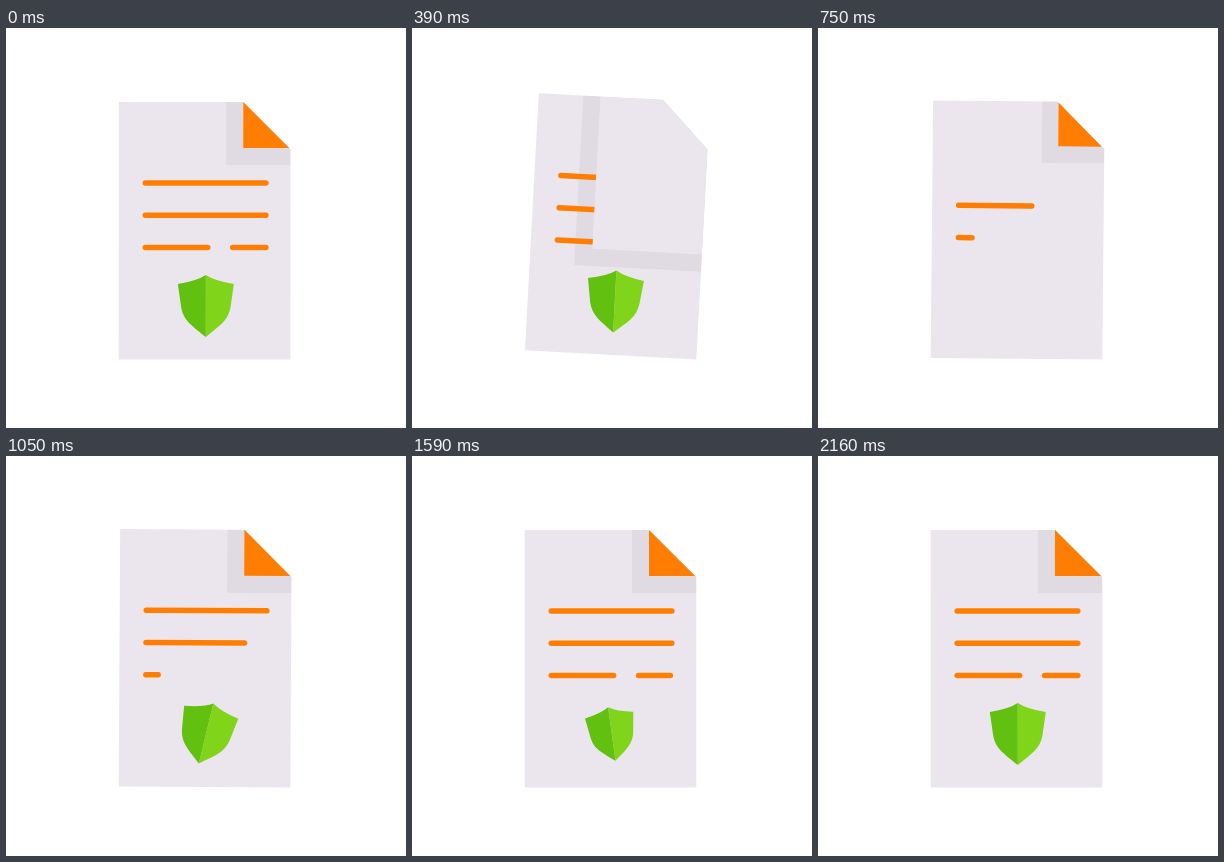
An HTML page with a canvas for the animation above (2800 ms loop, 400x400 px).

```html
<!DOCTYPE html>
<html>
<head>
<meta charset="utf-8">
<style>
html, body { margin: 0; height: 100%; overflow: hidden; background: #fff; }
canvas { display: block; }
</style>
</head>
<body>
<canvas id="stage" width="400" height="400"></canvas>
<script>
const ctx = document.getElementById('stage').getContext('2d');
const LOOP = 2800;
const PAPER = '#ebe6ed', SHADE = '#e0dbe3', ORANGE = '#ff7d00';
const GREEN_DARK = '#61c010', GREEN_LIGHT = '#80d41a';
const LEFT = 112.7, TOP = 74, RIGHT = 284.3, BOTTOM = 331.5;
const FOLD_W = 47.3, FOLD_H = 46, SHADOW = 17;

// x1, x2, y, start of drawing
const LINES = [
  [139.2, 259.8, 155, 410],
  [139.2, 259.8, 187.3, 620],
  [139.2, 201.6, 219.5, 875],
  [226.6, 259.8, 219.5, 1071]
];
const DRAW_TIME = 600;

const SWING = [[265, 6.9], [560, -3], [860, 2], [1120, 0]];
const SHIELD_SIZE = [[780, 0], [1130, 1.13], [1570, 0.87], [1920, 1]];
const SHIELD_TILT = [[780, 0], [1130, 15], [1570, -8], [1950, 0]];

const rad = deg => deg * Math.PI / 180;
const mix = (a, b, p) => a + (b - a) * p;
const ramp = (t, a, b) => Math.min(1, Math.max(0, (t - a) / (b - a)));
const ease = (t, a, b) => 0.5 - 0.5 * Math.cos(Math.PI * ramp(t, a, b));

function track(keys, t) {
  let value = keys[0][1];
  for (let i = 1; i < keys.length; i++) {
    if (t >= keys[i - 1][0]) value = mix(keys[i - 1][1], keys[i][1], ease(t, keys[i - 1][0], keys[i][0]));
  }
  return value;
}

function pageAngle(t) {
  const [peak, angle] = SWING[0];
  return t < peak ? angle * Math.sin(t / peak * Math.PI / 2) : track(SWING, t);
}

function pagePath() {
  ctx.beginPath();
  ctx.moveTo(LEFT, TOP);
  ctx.lineTo(RIGHT - FOLD_W, TOP);
  ctx.lineTo(RIGHT, TOP + FOLD_W);
  ctx.lineTo(RIGHT, BOTTOM);
  ctx.lineTo(LEFT, BOTTOM);
  ctx.closePath();
}

function cornerRect(w, h, color) {
  ctx.fillStyle = color;
  ctx.fillRect(RIGHT - w, TOP, w, h);
}

function drawLines(t, shift) {
  ctx.strokeStyle = ORANGE;
  ctx.lineWidth = 5.5;
  ctx.lineCap = 'round';
  for (const [x1, x2, y, start] of LINES) {
    const p = ease(t, start, start + DRAW_TIME);
    if (!p) continue;
    ctx.beginPath();
    ctx.moveTo(x1, y + shift);
    ctx.lineTo(mix(x1, x2, p), y + shift);
    ctx.stroke();
  }
}

function shieldHalf(side, color) {
  ctx.beginPath();
  ctx.moveTo(0, -31);
  ctx.quadraticCurveTo(9 * side, -25, 28 * side, -22);
  ctx.lineTo(25 * side, -1);
  ctx.bezierCurveTo(23 * side, 14, 16 * side, 18, 0, 31);
  ctx.closePath();
  ctx.fillStyle = color;
  ctx.fill();
}

function drawShield(size, tilt) {
  if (size <= 0) return;
  ctx.save();
  ctx.translate(199.8, 278);
  ctx.rotate(rad(tilt));
  ctx.scale(size, size);
  shieldHalf(1, GREEN_LIGHT);
  shieldHalf(-1, GREEN_DARK);
  ctx.restore();
}

function drawContent(t) {
  drawLines(t, 60 * (1 - ease(t, 410, 1010)));
  drawShield(track(SHIELD_SIZE, t), track(SHIELD_TILT, t));
}

function drawNewSheet(t) {
  const p = ease(t, 500, 780);
  const w = FOLD_W * p, h = FOLD_H * p;
  cornerRect(w + SHADOW * p, h + SHADOW * p, SHADE);
  drawContent(t);
  cornerRect(w, h, ORANGE);
}

function drawOldSheet(t) {
  const p = ease(t, 195, 585);
  const w = mix(FOLD_W, RIGHT - LEFT, p);
  const h = mix(FOLD_H, BOTTOM - TOP, p);
  cornerRect(w + SHADOW, h + SHADOW, SHADE);
  drawContent(LOOP);
  // the next sheet shows inside the opening corner
  ctx.beginPath();
  ctx.rect(RIGHT - w, TOP, w, h);
  ctx.clip();
  cornerRect(w, h, PAPER);
  drawNewSheet(t);
  ctx.globalAlpha = 1 - ramp(t, 185, 275);
  cornerRect(w, h, ORANGE);
}

function draw(t) {
  ctx.fillStyle = '#fff';
  ctx.fillRect(0, 0, 400, 400);
  ctx.save();
  ctx.translate(RIGHT, BOTTOM);
  ctx.rotate(rad(pageAngle(t)));
  ctx.translate(-RIGHT, -BOTTOM);
  pagePath();
  ctx.fillStyle = PAPER;
  ctx.fill();
  ctx.clip();
  if (t < 585) drawOldSheet(t);
  else drawNewSheet(t);
  ctx.restore();
}

const begin = performance.now();
function tick() {
  draw((performance.now() - begin) % LOOP);
  requestAnimationFrame(tick);
}
tick();
</script>
</body>
</html>
```
